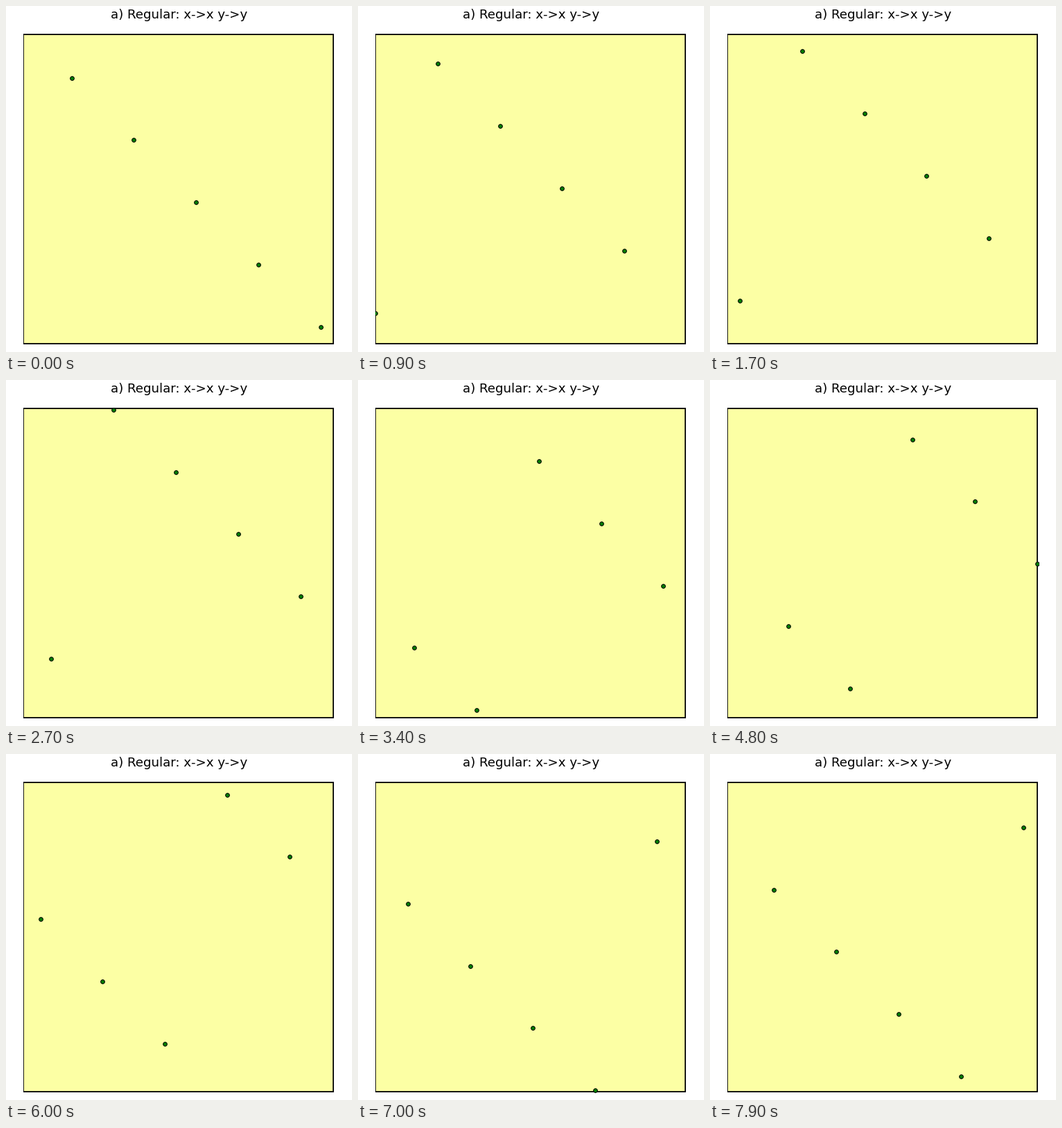
A matplotlib script for the animation above (8 s loop, 499x499 px).

```python
import numpy as np
import matplotlib.pyplot as plt
from matplotlib.animation import FuncAnimation
from matplotlib.patches import Rectangle

SIZE, DPI = 499, 64
PX = 72 / DPI            # points per pixel
FRAMES, INTERVAL = 80, 100
SPAN, STEPS = 449, 200   # width of the wrapping cell, steps to cross it
LEFT, BOTTOM = 25, 487.4

fig = plt.figure(figsize=(SIZE / DPI, SIZE / DPI), dpi=DPI, facecolor="white")
ax = fig.add_axes([0, 0, 1, 1])
ax.set(xlim=(0, SIZE), ylim=(SIZE, 0))
ax.axis("off")


def clip(artist):
    window = Rectangle((LEFT, 38), SPAN, 450, transform=ax.transData)
    artist.set_clip_path(window)
    return artist


clip(ax.add_patch(Rectangle((LEFT, 41), 447, 446, fc="#fcffa4", ec="black",
                            lw=1.8 * PX, joinstyle="miter", snap=False)))
ax.text(249.2, 18, "a) Regular: x->x y->y", ha="center", va="baseline",
        family="DejaVu Sans", size=18.3 * PX)

dots = clip(ax.scatter([], [], s=(5.7 * PX) ** 2, c="green",
                       edgecolors="black", linewidths=1.0 * PX, zorder=3))

# Whole-step positions keep the wrap at the cell edge exact
start_x = 31 + 40 * np.arange(5)
start_y = 171 - 40 * np.arange(5)


def update(i):
    x = LEFT + (start_x + i) % STEPS * SPAN / STEPS
    y = BOTTOM - (start_y + i) % STEPS * SPAN / STEPS
    dots.set_offsets(np.column_stack([x, y]))
    return dots,


anim = FuncAnimation(fig, update, frames=FRAMES, interval=INTERVAL,
                     repeat=True, repeat_delay=0)
plt.show()
```
